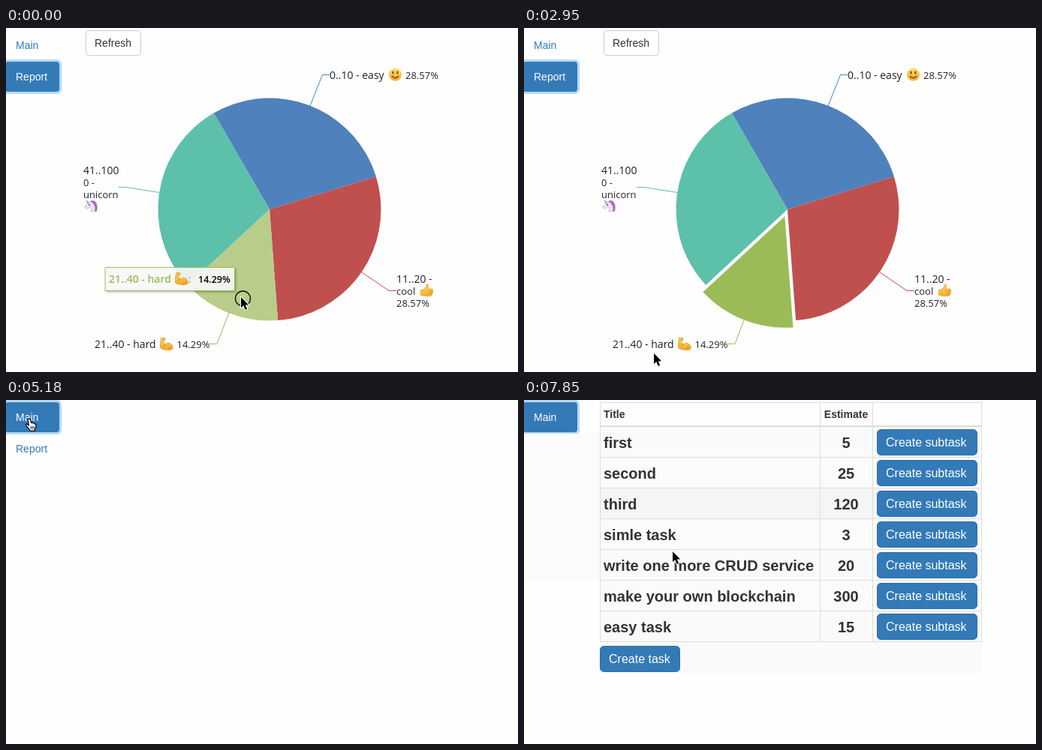
Animation of 682 by 459 pixels, one loop 7.99 s. Source, as an HTML page with a canvas:

```html
<!DOCTYPE html>
<html lang="en">
<head>
<meta charset="utf-8">
<title>Task report</title>
<style>
  html, body { margin: 0; width: 100%; height: 100%; overflow: hidden; background: #fefefe; }
  canvas { display: block; }
</style>
</head>
<body>
<canvas id="stage" width="682" height="459"></canvas>
<script>
const ctx = document.getElementById('stage').getContext('2d');
const LOOP = 7990;
const UI = '"Liberation Sans", Arial, sans-serif';
const CHART = '"Open Sans", "Noto Sans", sans-serif';
const BLUE = '#337ab7', GREEN = '#9bbb58';

// The screen updates in bursts: [first, last, count]
const bursts = [
  [140, 890, 6], [1180, 2210, 8], [2360, 3240, 7], [3990, 4590, 5],
  [4890, 5630, 6], [5920, 6370, 4], [7110, 7850, 6]
];
const ticks = [0];
for (const [a, b, n] of bursts)
  for (let i = 0; i < n; i++) ticks.push(Math.floor((a + (b - a) * i / (n - 1)) / 10) * 10);

const pointer = [
  [0, 313, 359], [740, 310, 369], [890, 308, 371], [1180, 306, 371], [1480, 256, 377],
  [1920, 207, 387], [2060, 205, 388], [2360, 202, 390], [2950, 172, 435], [3240, 165, 480],
  [3980, 165, 480], [3990, 246, 431], [4290, 59, 68], [4590, 31, 25], [5330, 31, 25],
  [5630, 168, 206], [5920, 167, 232], [6370, 164, 345], [7110, 166, 330],
  [7550, 190, 140], [7850, 198, 202]
];
const tipPath = [
  [0, 132, 319], [740, 127, 333], [890, 125, 334], [1180, 127, 335], [1480, 290, 336]
];

function along(keys, t) {
  const i = keys.findIndex(k => k[0] > t);
  if (i < 0) return keys[keys.length - 1].slice(1);
  const a = keys[i - 1], b = keys[i], u = (t - a[0]) / (b[0] - a[0]);
  return [1, 2].map(j => Math.round(a[j] + (b[j] - a[j]) * u));
}

function text(s, x, y, font, color = '#222', align = 'left') {
  ctx.font = font;
  ctx.fillStyle = color;
  ctx.textAlign = align;
  ctx.fillText(s, x, y);
}

function rect(x, y, w, h, color) {
  ctx.fillStyle = color;
  ctx.fillRect(x, y, w, h);
}

function box(x, y, w, h, r, fill, stroke) {
  ctx.beginPath();
  ctx.roundRect(x, y, w, h, r);
  ctx.fillStyle = fill;
  ctx.fill();
  if (!stroke) return;
  ctx.lineWidth = 1;
  ctx.strokeStyle = stroke;
  ctx.stroke();
}

function line(points, color, width = 1) {
  ctx.beginPath();
  points.forEach(([x, y]) => ctx.lineTo(x, y));
  ctx.lineWidth = width;
  ctx.strokeStyle = color;
  ctx.stroke();
}

function shape(d, fill, stroke, width = 1) {
  const p = new Path2D(d);
  if (fill) { ctx.fillStyle = fill; ctx.fill(p); }
  if (stroke) { ctx.lineWidth = width; ctx.strokeStyle = stroke; ctx.stroke(p); }
}

function at(x, y, draw) {
  ctx.save();
  ctx.translate(x, y);
  ctx.lineJoin = ctx.lineCap = 'round';
  draw();
  ctx.restore();
}

function glow(from, to) {
  const g = ctx.createLinearGradient(0, 0, 0, 18);
  g.addColorStop(0, from);
  g.addColorStop(1, to);
  return g;
}

function smile() {
  ctx.beginPath();
  ctx.arc(9, 9, 8.6, 0, 7);
  ctx.fillStyle = glow('#ffe36b', '#f4a72c');
  ctx.fill();
  shape('M6 5.4V7.6M12 5.4V7.6', null, '#6b3e12', 1.9);
  shape('M4.6 11.2Q9 15.8 13.4 11.2', null, '#7a4514', 1.3);
}

function thumb() {
  shape('M1 8.5L5 7.8Q8.5 5 8.6 1Q10.8 0 11.3 2.5Q11.5 4.5 10.4 7H15.5Q17.5 7.2 17 9.2' +
    'Q18 10.6 16.7 11.8Q17.2 13.4 15.8 14.2Q15.8 16.6 13.2 16.8H8Q4.5 16.3 1 15.5Z',
    glow('#ffd65c', '#f2aa2e'), '#dd9425', .6);
  shape('M11.5 9.3H16.4M12 11.9H16.4M11.8 14.3H15.6', null, '#d28b20', .7);
}

function arm() {
  shape('M2.2 1.2Q5 -.3 7.6 1.5Q8.3 3.4 6.6 4.8L5.2 5.3Q5.8 8 7 9.6Q11.5 6.3 15.4 9' +
    'Q18.3 11.5 17.6 16Q13 18.3 8 16.8Q3.5 16.8 1.2 14.4Q.2 9 2.2 1.2Z',
    glow('#ffd45a', '#f0a62c'), '#d99020', .6);
  shape('M7 9.6Q5.6 10.6 5.4 12M4.2 3.2L6.2 2.7M11.6 15Q14.8 15.2 16 12.6', null, '#bd7a1c', .8);
}

function unicorn() {
  shape('M1 10.5L6 5L9 3.2Q14 2.3 16 7Q17.8 11.5 16.6 16.5H8.5Q10.8 13 8.3 11.3L3.3 13.2Q1 13 1 10.5Z',
    '#e9e4ee', '#b9aec5', .6);
  shape('M8 3.3Q13 .8 15.6 4.4Q18.5 8.5 17 16.5H14Q15.6 10.6 12.7 7.2Q11.5 4.6 8 3.3Z', '#b45fc5');
  shape('M6.7 5.2L2.3 .6L4.8 6.5Z', '#9a79cf');
  ctx.beginPath();
  ctx.arc(7, 8, .9, 0, 7);
  ctx.fillStyle = '#39304a';
  ctx.fill();
}

function arrow() {
  const d = 'M0 0V14.3L3.3 11.3L5.7 17L8.2 16L5.8 10.4H10.2Z';
  shape(d, null, '#fff', 2.2);
  shape(d, '#000');
}

function hand() {
  shape('M-2 1.2L-.8 0L.7 .2L1.6 1.4L2.6 5.6L4 5L5.2 6L6.6 5.8L7.4 7L8.7 7.2L9 9.2L8.4 12.2' +
    'L7.4 14L7.4 16H1.2L0 14.2L-2.6 11L-4.6 8.5L-4.4 7.2L-3 7L-.6 9Z', '#fff', '#000', 1.2);
  shape('M2.2 10.3V13.4M4.2 10.2V13.4M6.2 10.2V13.3', null, '#000', .9);
}

function nav(active, hover) {
  ['Main', 'Report'].forEach((name, i) => {
    const y = 3 + 42 * i, on = i === active;
    if (on) {
      box(-4, y - 3, 78, 46, 6, '#b5d9f6');
      box(-1, y, 72, 40, 4, BLUE);
    } else if (i === hover) {
      box(-1, y, 72, 40, 4, '#eee');
    }
    text(name, 13, y + 25, '14px ' + UI, on ? '#fff' : BLUE);
  });
}

const CX = 351, CY = 242, R = 148.5;
const slices = [
  ['#4f81bc', 2], ['#c0504e', 2], [GREEN, 1], ['#5dc0ab', 2]
];

function pie(lit, out) {
  let a = -Math.PI * 2 / 3;
  slices.forEach(([color, share], i) => {
    const b = a + share * Math.PI * 2 / 7, mid = (a + b) / 2;
    const push = i === 2 && out ? 10 : 0;
    const x = CX + push * Math.cos(mid), y = CY + push * Math.sin(mid);
    ctx.beginPath();
    ctx.moveTo(x, y);
    ctx.arc(x, y, R, a, b);
    ctx.closePath();
    ctx.fillStyle = i === 2 && lit ? '#b9cd8a' : color;
    ctx.fill();
    a = b;
  });
}

function chart(lit, out) {
  box(106.5, 3.5, 73, 33, 4, '#fff', '#ccc');
  text('Refresh', 118, 25, '14px ' + UI, '#333');
  pie(lit, out);
  line([[405, 104], [421.5, 62.5], [431, 62.5]], slices[0][0]);
  line([[474, 326], [510, 350.5], [520, 350.5]], slices[1][0]);
  line([out ? [293, 390] : [297, 380], [281, 421.5], [271, 421.5]], GREEN);
  line([[204, 219.5], [160, 212.5], [150, 212.5]], slices[3][0]);

  const word = '14px ' + CHART, small = '13px ' + CHART;
  text('0..10 - easy', 431, 68, word);
  at(509.5, 53, smile);
  text('28.57%', 532, 68, small);
  text('11..20 -', 520, 340, word);
  text('cool', 520, 356, small);
  at(551.5, 341, thumb);
  text('28.57%', 520, 372, small);
  text('21..40 - hard', 118, 427, word);
  at(204.5, 412.5, arm);
  text('14.29%', 227.5, 427, small);
  text('41..100', 103, 195, word);
  text('0 -', 103, 211, small);
  text('unicorn', 103, 227, small);
  at(104, 228, unicorn);
}

function tooltip([x, y]) {
  at(x, y, () => {
    rect(2, 2, 174, 33, 'rgba(0,0,0,.1)');
    rect(1, 1, 173, 32, 'rgba(0,0,0,.12)');
    rect(0, 0, 173, 32, 'rgba(255,255,255,.88)');
    ctx.strokeStyle = GREEN;
    ctx.lineWidth = 1;
    ctx.strokeRect(.5, .5, 172, 31);
    text('21..40 - hard', 5, 21, '600 14px ' + CHART, GREEN);
    at(92.5, 6.5, arm);
    text(':', 110.5, 21, '600 14px ' + CHART, GREEN);
    text('14.29%', 124, 21, '600 12.5px ' + CHART, '#000');
  });
}

const tasks = [
  ['first', 5], ['second', 25], ['third', 120], ['simle task', 3],
  ['write one more CRUD service', 20], ['make your own blockchain', 300], ['easy task', 15]
];

function table(tinted, pressed) {
  rect(0, 45, 101, 195, '#fbfbfb');
  rect(101, 323, 509, 41, '#fafafa');
  const bold = '700 20px ' + UI, grid = '#ddd';
  text('Title', 106, 24, '700 14px ' + UI, '#333');
  text('Estimate', 429, 24, '700 14px ' + UI, '#333', 'center');
  tasks.forEach(([name, points], i) => {
    const y = 36 + 41 * i;
    rect(101, y, 509, 41, i === tinted ? '#f5f5f5' : i % 2 ? '#fbfbfb' : '#fafafa');
    text(name, 106, y + 28, bold, '#333');
    text(points, 429, y + 28, bold, '#333', 'center');
    box(470.5, y + 3.5, 133, 34, 5, BLUE, '#2e6da4');
    text('Create subtask', 482, y + 26, '16px ' + UI, '#fff');
    rect(101, y + 40, 509, 1, grid);
  });
  rect(101, 3, 509, 1, grid);
  rect(101, 34, 509, 2, grid);
  for (const x of [101, 394, 464, 609]) rect(x, 3, 1, 320, grid);
  box(101.5, 328.5, 106, 34, 5, pressed ? '#286090' : BLUE, pressed ? '#204d74' : '#2e6da4');
  text('Create task', 113, 351, '16px ' + UI, '#fff');
}

function render(now) {
  let t = 0;
  for (const k of ticks) if (k <= now) t = k;
  const [px, py] = along(pointer, t);
  const overMain = t >= 4440 && t < 5480;
  const overButton = t >= 6220 && t < 7260;

  rect(0, 0, 682, 459, '#fefefe');
  nav(t < 5040 ? 1 : 0, overMain ? 0 : -1);
  if (t < 5040) chart(t < 1470, t >= 890);
  if (t < 2800) tooltip(along(tipPath, t));
  if (t >= 5480) {
    const row = Math.floor((py - 36) / 41);
    table(t >= 7550 ? 2 : t >= 5630 ? row : -1, overButton);
  }

  if (t < 290) {
    ctx.beginPath();
    ctx.arc(px + 2.5, py + 2, 10, 0, 7);
    ctx.lineWidth = 1.4;
    ctx.strokeStyle = '#111';
    ctx.stroke();
  }
  at(px, py, t === 4290 || overMain || overButton ? hand : arrow);
}

const start = performance.now();
function loop() {
  render((performance.now() - start) % LOOP);
  requestAnimationFrame(loop);
}
loop();
</script>
</body>
</html>
```
